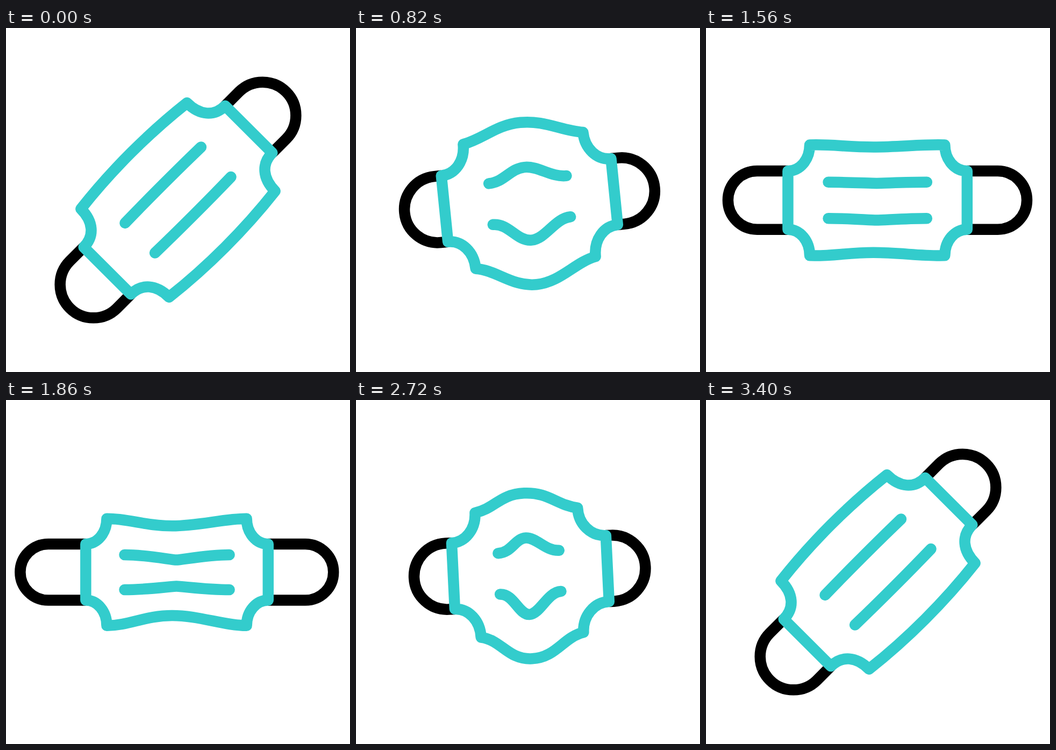
Recreate the animation shown at these times as an HTML page. Size 640 by 640 pixels, loop 3.6 s.

```html
<!DOCTYPE html>
<html lang="en">
<head>
<meta charset="utf-8">
<title>Stretching face mask</title>
<style>
  html, body { margin: 0; width: 100%; height: 100%; overflow: hidden; background: #fff; }
  svg { display: block; width: 100%; height: 100%; }
  path { fill: none; stroke-width: 20.5; stroke-linecap: round; stroke-linejoin: round; }
</style>
</head>
<body>
<svg viewBox="0 0 640 640">
  <g id="mask">
    <path id="loops" stroke="#000" style="stroke-linecap: butt"/>
    <path id="body" stroke="#33cccc"/>
    <path id="folds" stroke="#33cccc"/>
  </g>
</svg>
<script>
const LOOP = 3600;
const TILT = -45;

// Pose values are relative to the centre of the mask; ranges are [left, right] or [top, bottom].
const rest = {
  loopX: [-284.5, 284.5], sideX: [-186, 186], sideY: [-62, 62],
  cornerX: [-139.5, 139.5], cornerY: [-116, 116], notch: 0.615,
  midX: 0, midY: [-124, 124], edge: [46, 5.4, 46],
  foldX: [-100, 100], foldY: [-39.3, 39.3],
  foldMidX: 0, foldMidY: [-40.3, 40.3], fold: [33, 0.7, 33]
};
const bulge = {
  loopX: [-223, 229.6], sideX: [-151.5, 157.8], sideY: [-61, 62.5],
  cornerX: [-105.2, 110.8], cornerY: [-115, 117.5], notch: 0.56,
  midX: 0, midY: [-148, 163], edge: [38, 7, 45],
  foldX: [-65, 72], foldY: [-37.5, 39],
  foldMidX: -1, foldMidY: [-64.4, 80], fold: [29, 0, 26]
};
const narrow = {
  ...bulge,
  loopX: [-210.7, 217.3], sideX: [-138.7, 147.6], cornerX: [-92.4, 97.3],
  foldX: [-53, 59], fold: [25, 0, 20]
};
const wide = {
  loopX: [-294.5, 290], sideX: [-172, 168], sideY: [-52, 52.5],
  cornerX: [-133, 128], cornerY: [-99, 99.5], notch: 0.56,
  midX: -11, midY: [-85, 80], edge: [42, 0, 50],
  foldX: [-100, 96], foldY: [-32, 33],
  foldMidX: -3, foldMidY: [-22, 26], fold: [42, 0, 10]
};

const poseKeys = [[200, rest], [1000, bulge], [1800, wide], [2800, narrow], [3400, rest]];
const tiltKeys = [[200, TILT], [1000, 0], [2600, 0], [3400, TILT]];

const ease = u => u * u * (3 - 2 * u);

function mix(a, b, p) {
  if (typeof a === "number") return a + (b - a) * p;
  if (Array.isArray(a)) return a.map((v, i) => mix(v, b[i], p));
  return Object.fromEntries(Object.keys(a).map(k => [k, mix(a[k], b[k], p)]));
}

function valueAt(keys, t) {
  if (t <= keys[0][0]) return keys[0][1];
  const i = keys.findIndex(([time]) => time > t);
  if (i < 0) return keys[keys.length - 1][1];
  const [t0, a] = keys[i - 1], [t1, b] = keys[i];
  return mix(a, b, ease((t - t0) / (t1 - t0)));
}

// Two cubics from x0 to x1 that meet level at the middle point.
function wave(x0, x1, y, midX, midY, [reach, rise, midReach], side) {
  const dir = Math.sign(x1 - x0);
  const lift = y + rise * side;
  return `C${x0 + reach * dir} ${lift} ${midX - midReach * dir} ${midY} ${midX} ${midY}` +
         `S${x1 - reach * dir} ${lift} ${x1} ${y}`;
}

function bodyPath(p) {
  const [sl, sr] = p.sideX, [st, sb] = p.sideY;
  const [cl, cr] = p.cornerX, [ct, cb] = p.cornerY;
  // Hollow quarter round: upright at the corner, level at the side.
  const notchIn = (cx, cy, sx, sy) =>
    `C${cx} ${mix(cy, sy, p.notch)} ${mix(sx, cx, p.notch)} ${sy} ${sx} ${sy}`;
  const notchOut = (sx, sy, cx, cy) =>
    `C${mix(sx, cx, p.notch)} ${sy} ${cx} ${mix(cy, sy, p.notch)} ${cx} ${cy}`;
  return `M${cl} ${ct}` + wave(cl, cr, ct, p.midX, p.midY[0], p.edge, -1) +
    notchIn(cr, ct, sr, st) + `V${sb}` + notchOut(sr, sb, cr, cb) +
    wave(cr, cl, cb, p.midX, p.midY[1], p.edge, 1) +
    notchIn(cl, cb, sl, sb) + `V${st}` + notchOut(sl, st, cl, ct) + "Z";
}

function loopsPath(p) {
  const [top, bottom] = p.sideY;
  const r = (bottom - top) / 2;
  return [-1, 1].map((dir, i) => {
    const turn = p.loopX[i] - dir * r;
    return `M${p.sideX[i]} ${top}H${turn}A${r} ${r} 0 0 ${i} ${turn} ${bottom}H${p.sideX[i]}`;
  }).join("");
}

function foldsPath(p) {
  const [l, r] = p.foldX;
  return [-1, 1].map((side, i) =>
    `M${l} ${p.foldY[i]}` + wave(l, r, p.foldY[i], p.foldMidX, p.foldMidY[i], p.fold, side)
  ).join("");
}

const byId = id => document.getElementById(id);
const [mask, loops, body, folds] = ["mask", "loops", "body", "folds"].map(byId);

function draw(t) {
  const pose = valueAt(poseKeys, t);
  mask.setAttribute("transform", `translate(320 320) rotate(${valueAt(tiltKeys, t)})`);
  loops.setAttribute("d", loopsPath(pose));
  body.setAttribute("d", bodyPath(pose));
  folds.setAttribute("d", foldsPath(pose));
}

const start = performance.now();
function tick(now) {
  draw(Math.max(0, now - start) % LOOP);
  requestAnimationFrame(tick);
}
draw(0);
requestAnimationFrame(tick);
</script>
</body>
</html>
```
